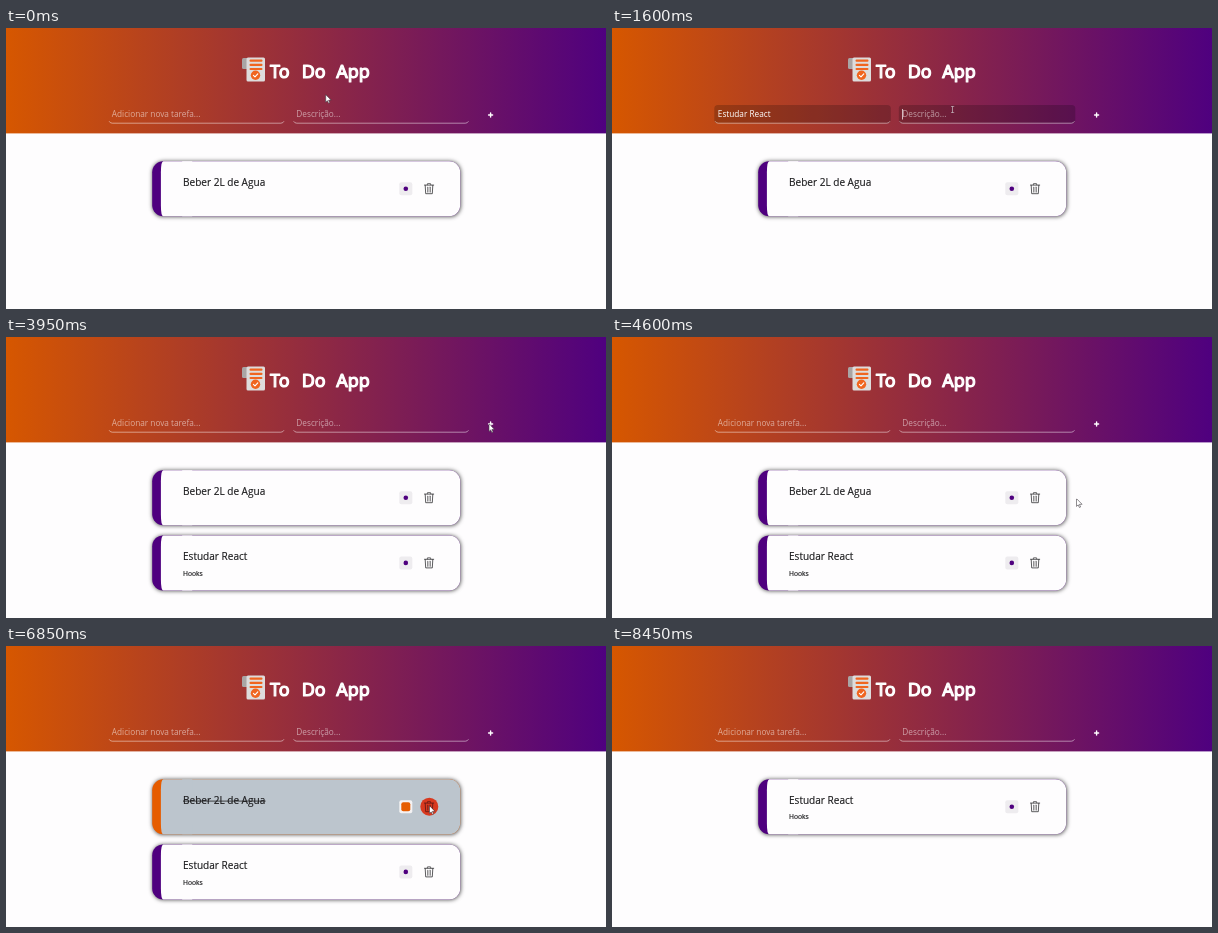
These frames come from a looping animation (600 by 281 pixels, 8500 ms). An HTML page with a canvas:

```html
<!DOCTYPE html>
<html lang="pt">
<head>
<meta charset="utf-8">
<title>To Do App</title>
<style>
html, body { margin: 0; width: 100%; height: 100%; overflow: hidden; background: #fefdfe; }
canvas { display: block; width: 600px; height: 281px; }
</style>
</head>
<body>
<canvas id="stage"></canvas>
<script>
const canvas = document.getElementById('stage');
const dpr = window.devicePixelRatio || 1;
canvas.width = 600 * dpr;
canvas.height = 281 * dpr;
const c = canvas.getContext('2d');

const LOOP = 8500, STEP = 50;
const PURPLE = '#4f007f', ORANGE = '#e65c00', PAPER = '#fefdfe';
const UI = '"Open Sans", "Noto Sans", sans-serif';
const ROUND = '"Noto Sans", "Open Sans", sans-serif';

// Moments of the session
const FOCUS_TASK = 500, FOCUS_NOTE = 1500, ADD = 3750, CHECK = 5350, REMOVE = 7550;
const task = { text: 'Estudar React', start: 650, gap: 62 };
const note = { text: 'Hooks', start: 2100, gap: 130 };

// Pointer stops: time, x, y
const route = [
  [0, 319.7, 66.8], [100, 319.7, 66.8], [450, 214, 87], [1250, 214, 87],
  [1500, 340.5, 81.5], [1800, 340.5, 81.5], [2300, 339.5, 95.5], [3000, 339.5, 95.5],
  [3500, 483, 87], [3950, 483, 87], [4500, 464.5, 162], [4700, 464.5, 162],
  [5150, 400, 161], [5450, 400, 161], [5750, 414, 173], [6000, 414, 173],
  [6350, 423.5, 160], [7650, 423.5, 160], [8050, 431, 290], [LOOP, 431, 290]
];

function pointerAt(t) {
  const i = route.findIndex(p => p[0] > t);
  const a = route[i - 1], b = route[i];
  const k = (t - a[0]) / (b[0] - a[0]), e = k * k * (3 - 2 * k);
  return { x: a[1] + (b[1] - a[1]) * e, y: a[2] + (b[2] - a[2]) * e };
}

function box(x, y, w, h, r, fill) {
  c.beginPath();
  c.roundRect(x, y, w, h, r);
  c.fillStyle = fill;
  c.fill();
}

function disc(x, y, r, fill) {
  c.beginPath();
  c.arc(x, y, r, 0, 7);
  c.fillStyle = fill;
  c.fill();
}

function line(points, color, width) {
  c.beginPath();
  points.forEach(([x, y]) => c.lineTo(x, y));
  c.strokeStyle = color;
  c.lineWidth = width;
  c.stroke();
}

function label(text, x, y, font, color, bold = 0) {
  c.font = font;
  c.fillStyle = color;
  c.fillText(text, x, y);
  if (bold) {
    c.strokeStyle = color;
    c.lineWidth = bold;
    c.strokeText(text, x, y);
  }
}

const typed = (f, t) => f.text.slice(0, Math.max(0, Math.floor((t - f.start) / f.gap) + 1));

function header() {
  const g = c.createLinearGradient(0, 0, 600, 0);
  g.addColorStop(0, '#d65700');
  g.addColorStop(1, PURPLE);
  c.fillStyle = g;
  c.fillRect(0, 0, 600, 105.4);

  box(236, 30, 8, 11, 1.5, '#a9a5a5');
  box(240.5, 29.5, 18.5, 24, 1.5, '#dedcdc');
  for (const y of [32.3, 36.5, 40.7]) box(243.5, y - 0.8, 13, 2.2, 1, '#f0651f');
  disc(249.5, 47.3, 4.7, '#f0651f');
  line([[247.4, 47.3], [249, 48.9], [251.8, 45.8]], '#fff', 1.1);

  const font = '18px ' + ROUND;
  label('To', 264, 49.8, font, '#fff', 1.2);
  label('Do', 295.7, 49.8, font, '#fff', 1.2);
  label('App', 330.3, 49.8, font, '#fff', 1.2);

  line([[482.6, 87], [486.6, 87]], '#fff', 1.4);
  line([[484.6, 85], [484.6, 89]], '#fff', 1.4);
}

function field(x, text, hint, dark, caret) {
  const y = 77, w = 176.5, h = 18.2;
  if (dark) box(x, y, w, h, 3.5, 'rgba(0,0,0,.2)');
  c.beginPath();
  c.moveTo(x + 1, y + h - 1.6);
  c.quadraticCurveTo(x + 1.8, y + h, x + 4, y + h);
  c.lineTo(x + w - 4, y + h);
  c.quadraticCurveTo(x + w - 1.8, y + h, x + w - 1, y + h - 1.6);
  c.strokeStyle = 'rgba(255,255,255,.6)';
  c.lineWidth = 0.8;
  c.stroke();
  const font = '8.25px ' + UI;
  label(text || hint, x + 3.5, 89.3, font, text ? '#fff' : 'rgba(255,255,255,.55)');
  if (caret) {
    c.fillStyle = '#fff';
    c.fillRect(x + 3.5 + (text ? c.measureText(text).width : 0), 81, 0.7, 10.5);
  }
}

function trash(x, y, color) {
  line([[x - 4.7, y - 3.6], [x + 4.7, y - 3.6]], color, 0.8);
  line([[x - 1.8, y - 3.8], [x - 1.5, y - 5.1], [x + 1.5, y - 5.1], [x + 1.8, y - 3.8]], color, 0.7);
  line([[x - 3.8, y - 3.4], [x - 3.3, y + 5], [x + 3.3, y + 5], [x + 3.8, y - 3.4]], color, 0.8);
  for (const d of [-1.5, 0, 1.5]) line([[x + d, y - 1.7], [x + d, y + 3.4]], color, 0.55);
}

function card(y, title, detail, done, hot) {
  const x = 146.2, w = 308, h = 55, r = 11;
  c.save();
  c.shadowColor = 'rgba(0,0,0,.75)';
  c.shadowBlur = 4.5 * dpr;
  c.shadowOffsetX = c.shadowOffsetY = 0.4 * dpr;
  box(x, y, w, h, r, done ? ORANGE : PURPLE);
  c.restore();

  // Right edge first in paper colour so no stripe tint shows around the rim
  const fill = done ? '#bcc5cd' : PAPER;
  box(x + 30, y, w - 30, h, [0, r, r, 0], fill);
  const in0 = x + 8.7;
  c.beginPath();
  c.moveTo(in0 + 2.5, y);
  c.lineTo(x + 40, y);
  c.lineTo(x + 40, y + h);
  c.lineTo(in0 + 2.5, y + h);
  c.quadraticCurveTo(in0, y + h, in0, y + h - r);
  c.lineTo(in0, y + r);
  c.quadraticCurveTo(in0, y, in0 + 2.5, y);
  c.fill();

  const font = '10.05px ' + UI;
  label(title, 177, y + 24.8, font, '#1c1c1e', 0.15);
  if (done) line([[177, y + 21.9], [177 + c.measureText(title).width, y + 21.9]], '#1c1c1e', 0.8);
  if (detail) label(detail, 177, y + 40.2, '6.7px ' + ROUND, '#1c1c1e', 0.15);

  const my = y + 27.5;
  box(393.3, my - 6.5, 13, 13, 2, done ? '#f4f2f3' : '#eeecef');
  if (done) box(395.3, my - 4.5, 9, 9, 2, ORANGE);
  else disc(399.8, my, 2.3, PURPLE);

  if (hot) disc(423.3, my, 9, '#d8391f');
  trash(423, my, hot ? '#5c1512' : '#343436');
}

function arrow(x, y) {
  c.beginPath();
  [[0, 0], [0, 7.4], [1.7, 5.9], [2.9, 8.5], [4.1, 8], [2.9, 5.4], [5.2, 5.3]]
    .forEach(([dx, dy]) => c.lineTo(x + dx, y + dy));
  c.closePath();
  c.fillStyle = '#fff';
  c.fill();
  c.strokeStyle = '#454047';
  c.lineWidth = 0.6;
  c.stroke();
}

function beam(x, y) {
  const color = '#c9bfc5';
  line([[x, y - 3], [x, y + 3]], color, 0.7);
  for (const d of [-3, 3]) line([[x - 1.3, y + d], [x + 1.3, y + d]], color, 0.6);
}

function draw(t) {
  c.setTransform(dpr, 0, 0, dpr, 0, 0);
  c.lineCap = c.lineJoin = 'round';
  c.fillStyle = PAPER;
  c.fillRect(0, 0, 600, 281);

  const p = pointerAt(t);
  const overRow = p.y >= 76 && p.y <= 97;
  const over = x => overRow && p.x >= x && p.x <= x + 176;
  const added = t >= ADD;
  const first = added ? '' : typed(task, t);
  const second = added ? '' : typed(note, t);
  const inTask = t >= FOCUS_TASK && t < FOCUS_NOTE;
  const inNote = t >= FOCUS_NOTE && t < 3500;

  // The caret restarts its blink at every key
  const f = inTask ? task : note;
  const since = inTask ? FOCUS_TASK : FOCUS_NOTE;
  const count = typed(f, t).length;
  const lastKey = count ? f.start + (count - 1) * f.gap : since;
  const lit = (t - lastKey) % 1060 < 530;

  header();
  field(102.3, first, 'Adicionar nova tarefa...', first || inTask || over(102.3), inTask && lit);
  field(286.8, second, 'Descrição...', second || inNote || over(286.8), inNote && lit);

  const hot = Math.hypot(p.x - 423, p.y - 160) < 8;
  if (t < REMOVE) {
    card(133.2, 'Beber 2L de Agua', '', t >= CHECK, hot);
    if (added) card(198.4, task.text, note.text, false, false);
  } else {
    card(133.2, task.text, note.text, false, hot);
  }

  if (over(102.3) || over(286.8)) beam(p.x, p.y);
  else arrow(p.x, p.y);
}

const begin = performance.now();
function tick() {
  const t = (performance.now() - begin) % LOOP;
  draw(Math.floor(t / STEP) * STEP);
  requestAnimationFrame(tick);
}
tick();
</script>
</body>
</html>
```
